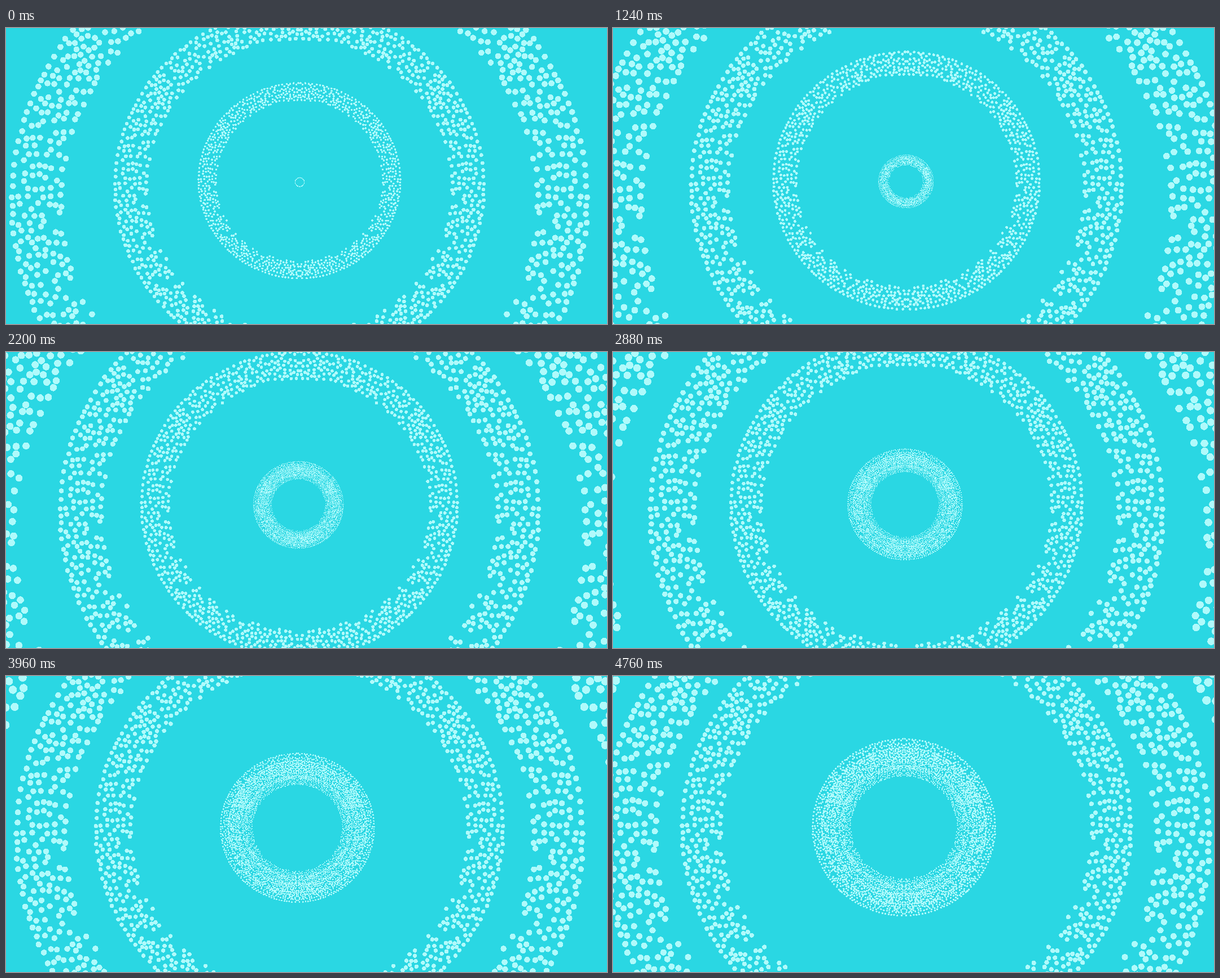
Write an HTML page with a canvas that moves like this. It is 1065 by 526 pixels and loops after 4800 ms.

```html
<!DOCTYPE html>
<html lang="en">
<head>
<meta charset="utf-8">
<title>Dotted ripples</title>
<style>
html, body { margin: 0; width: 100%; height: 100%; overflow: hidden; background: #2ad7e3; }
canvas { display: block; width: 1065px; height: 526px; }
</style>
</head>
<body>
<canvas id="stage" width="1065" height="526"></canvas>
<script>
const W = 1065, H = 526, LOOP = 4800, STEP = 40;
const SQUASH = 0.97, DOT = 0.0102, GAP = 0.0198, HALF_COUNT = 550;
const OUTER = 0.99, BAND = 0.175, COPIES = 4;
const ctx = document.getElementById('stage').getContext('2d');
const image = ctx.createImageData(W, H);
const pixels = new Uint32Array(image.data.buffer);
const BACK = 0xffe3d72a, LIGHT = 0xfffbfab0; // ABGR

let seed = 20117;
function random() {
  seed = (Math.imul(seed, 1664525) + 1013904223) >>> 0;
  return seed / 4294967296;
}

function polar(angle, r) {
  return [Math.cos(angle) * r, Math.sin(angle) * r * SQUASH];
}

// Half a ring in units of its radius: an even rim, then a scatter that
// thins inward and clusters near the top, the bottom and the upper side.
function makePattern() {
  const dots = [];
  for (let a = -1.56; a < 1.56; a += 0.028 + 0.02 * random()) {
    dots.push(polar(a, OUTER - 0.006 * random()));
  }
  for (let tries = 0; dots.length < HALF_COUNT && tries < 40000; tries++) {
    const a = (random() - 0.5) * Math.PI;
    const [x, y] = polar(a, OUTER - BAND * Math.pow(random(), 1.25));
    const cluster = Math.max(Math.abs(Math.sin(a)) ** 8, Math.exp(-(((a + 0.48) / 0.2) ** 2)));
    if (x < 0.007 || random() > 0.55 + 0.45 * cluster) continue;
    if (dots.every(d => Math.hypot(d[0] - x, d[1] - y) > GAP)) dots.push([x, y]);
  }
  return dots;
}

const patterns = Array.from({ length: COPIES }, makePattern);

// Hard-edged disc: fills each pixel whose centre lies inside.
function disc(cx, cy, r) {
  const y0 = Math.max(0, Math.ceil(cy - r - 0.5));
  const y1 = Math.min(H - 1, Math.floor(cy + r - 0.5));
  for (let y = y0; y <= y1; y++) {
    const dy = y + 0.5 - cy;
    const w = Math.sqrt(Math.max(0, r * r - dy * dy));
    const x0 = Math.max(0, Math.ceil(cx - w - 0.5));
    const x1 = Math.min(W - 1, Math.floor(cx + w - 0.5));
    if (x1 >= x0) pixels.fill(LIGHT, y * W + x0, y * W + x1 + 1);
  }
}

function ring(pattern, cx, cy, radius) {
  const r = radius * DOT;
  for (const [x, y] of pattern) {
    disc(cx - x * radius, cy + y * radius, r);
    disc(cx + x * radius, cy + y * radius, r);
  }
}

// Outer rings: start radius, growth per ms, downward shift in radii.
const RINGS = [
  { start: 181, speed: 0.0465, shift: 0 },
  { start: 331, speed: 0.0446, shift: 0.03 },
  { start: 516, speed: 0.0472, shift: 0.07 }
];

function draw(t) {
  pixels.fill(BACK);
  for (const { start, speed, shift } of RINGS) {
    const radius = start + speed * t;
    ring(patterns[0], 520, 271.5 + shift * radius, radius);
  }
  // The centre ring fans out into nested copies as it grows.
  const drift = 0.00105 * t;
  patterns.forEach((pattern, k) => {
    ring(pattern, 520.5 - drift, 274 - drift, 9 + (0.0325 - 0.0034 * k) * t);
  });
  ctx.putImageData(image, 0, 0);
}

let shown = -1;
function frame() {
  const t = Math.floor((performance.now() % LOOP) / STEP) * STEP;
  if (t !== shown) draw(shown = t);
  requestAnimationFrame(frame);
}
frame();
</script>
</body>
</html>
```
